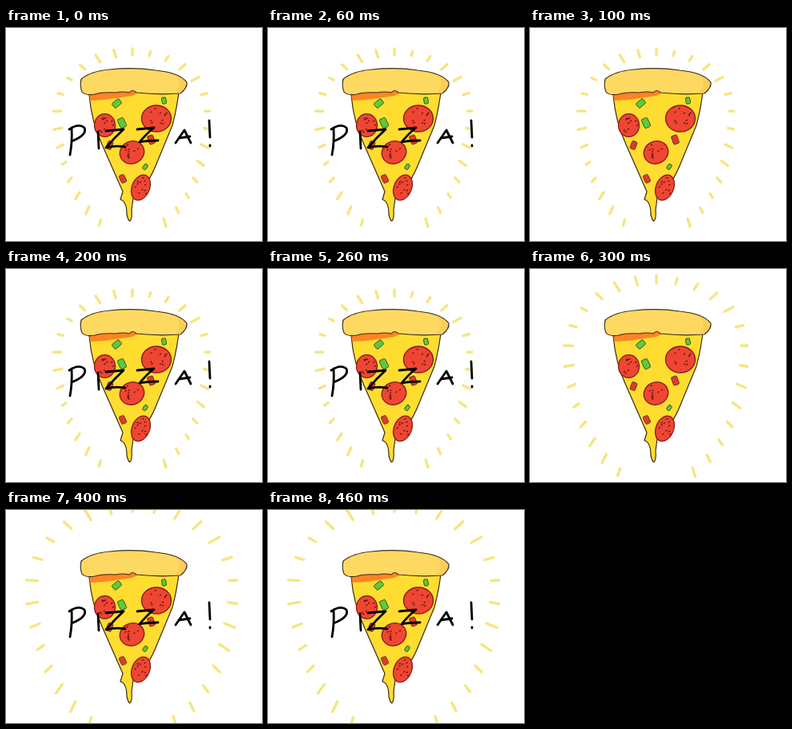
Recreate the animation shown at these times as an HTML page. Size 320 px wide and 267 px high, loop 500 ms.

```html
<!DOCTYPE html>
<html lang="en">
<meta charset="utf-8">
<title>Pizza!</title>
<style>
  html, body { margin: 0; width: 100%; height: 100%; overflow: hidden; background: #fff }
  svg { display: block; width: 100vw; height: 100vh; stroke-linecap: round; stroke-linejoin: round }
</style>
<svg viewBox="0 0 320 267">
  <path id="rays" fill="none" stroke="#f5e680" stroke-width="3.4"/>

  <g stroke="#3b2a1a" stroke-width="1.2">
    <path fill="#ffdd30" d="M103 72L104 84Q107 118 120 146L146 205 143 215Q151 217 151 234 153 242 155 242 158 239 157 228L159 213Q178 197 189 168L208 122Q214 100 217 72Z"/>
    <path fill="#ff8424" stroke="none" d="M104 78H171L158 85 123 90 105 91Z"/>
    <path fill="#fed962" d="M94 64Q106 54 130 52 160 49 187 53 217 56 226 68 227 75 218 82 190 84 163 81 158 76 154 81 146 79 137 81 121 80 111 83 99 85 95 80 92 73 94 64Z"/>
    <path fill="#fbc652" stroke="none" opacity=".65" d="M210 58Q224 64 225 70 223 80 211 82 222 69 210 58Z"/>
  </g>

  <g id="pepperoni" fill="#ee4632" stroke="#86181b" stroke-width="1.3"></g>
  <path id="specks" fill="none" stroke="#6b1a16" stroke-width="1.5"/>
  <g id="bits" stroke="#3d3a1c" stroke-width=".8"></g>

  <g id="lettering" role="img" aria-label="PIZZA!" fill="none" stroke="#000" stroke-width="2.8">
    <path d="M82 125Q83 143 80 159M79 127Q91 119 98 125 102 134 82 142"/>
    <path d="M115 130L116 151"/>
    <path d="M125 129L147 127Q136 137 125 150 136 147 149 149"/>
    <path d="M164 127L185 125Q176 132 167 143 177 141 190 141"/>
    <path d="M212 144L223 128 231 144M216 138L230 136"/>
    <path d="M254 116L255 137M255 147v1"/>
  </g>
</svg>
<script>
const byId = id => document.getElementById(id);
const svgNS = "http://www.w3.org/2000/svg";
let seed = 7;
const random = () => (seed = seed * 16807 % 2147483647) / 2147483647;

function add(parent, tag, attributes) {
  const node = byId(parent).appendChild(document.createElementNS(svgNS, tag));
  for (const name in attributes) node.setAttribute(name, attributes[name]);
}

function addPepperoni(cx, cy, rx, ry, tilt) {
  add("pepperoni", "ellipse", { cx, cy, rx, ry, transform: `rotate(${tilt} ${cx} ${cy})` });
  let specks = byId("specks").getAttribute("d") || "";
  for (let i = 0; i < 11; i++) {
    const angle = random() * 2 * Math.PI, r = .8 * Math.sqrt(random());
    specks += `M${cx + rx * r * Math.cos(angle)} ${cy + ry * r * Math.sin(angle)}l1 -.6`;
  }
  byId("specks").setAttribute("d", specks);
}

function addBit(x, y, size, tilt, fill) {
  add("bits", "rect", {
    x: x - size / 3, y: y - size / 2, width: size / 1.5, height: size, rx: 1.5,
    fill, transform: `rotate(${tilt} ${x} ${y})`
  });
}

addPepperoni(123.5, 122, 13, 14.3, 0);
addPepperoni(188, 113.5, 18.5, 16.5, 0);
addPepperoni(157.5, 156, 15.5, 14, -25);
addPepperoni(168.5, 200, 11, 16.5, 22);

const green = "#5bcb3c", red = "#e8382d";
addBit(138.5, 94.5, 11, 50, green);
addBit(145, 119, 12, -25, green);
addBit(197.5, 91, 8, -10, green);
addBit(174, 174, 7, 35, green);
addBit(129.5, 147, 10, 20, red);
addBit(181.5, 140, 11, -20, red);
addBit(146, 189, 10, -25, red);

// Rays stand evenly along an egg that widens with each burst, open at the bottom
const CX = 158, RAYS = 30;
const egg = document.createElementNS(svgNS, "path");

function rayPath(burst) {
  const cy = 105 - 5 * burst, rx = 94 + 16 * burst;
  const up = 75 + 12 * burst, down = 154 + 17 * burst;
  egg.setAttribute("d", `M${CX} ${cy - up}a${rx} ${up} 0 0 1 ${rx} ${up}` +
    `a${rx} ${down} 0 0 1 ${-2 * rx} 0a${rx} ${up} 0 0 1 ${rx} ${-up}`);
  const total = egg.getTotalLength();
  let d = "";
  for (let i = 0; i < RAYS; i++) {
    const { x, y } = egg.getPointAtLength(total * i / RAYS);
    if (y > 220 && Math.abs(x - CX) < 38) continue;
    const angle = Math.atan2(y - cy, x - CX);
    const half = 4 + burst + 1.2 * Math.sin(i * 5);
    const dx = half * Math.cos(angle), dy = half * Math.sin(angle);
    d += `M${x - dx} ${y - dy}l${2 * dx} ${2 * dy}`;
  }
  return d;
}

const start = performance.now();
function draw(now) {
  const step = Math.floor(Math.max(0, now - start) % 500 / 100);
  byId("rays").setAttribute("d", rayPath(Math.max(0, step - 2)));
  byId("lettering").style.display = step % 2 ? "none" : "";
  requestAnimationFrame(draw);
}
draw(start);
</script>
</html>
```
